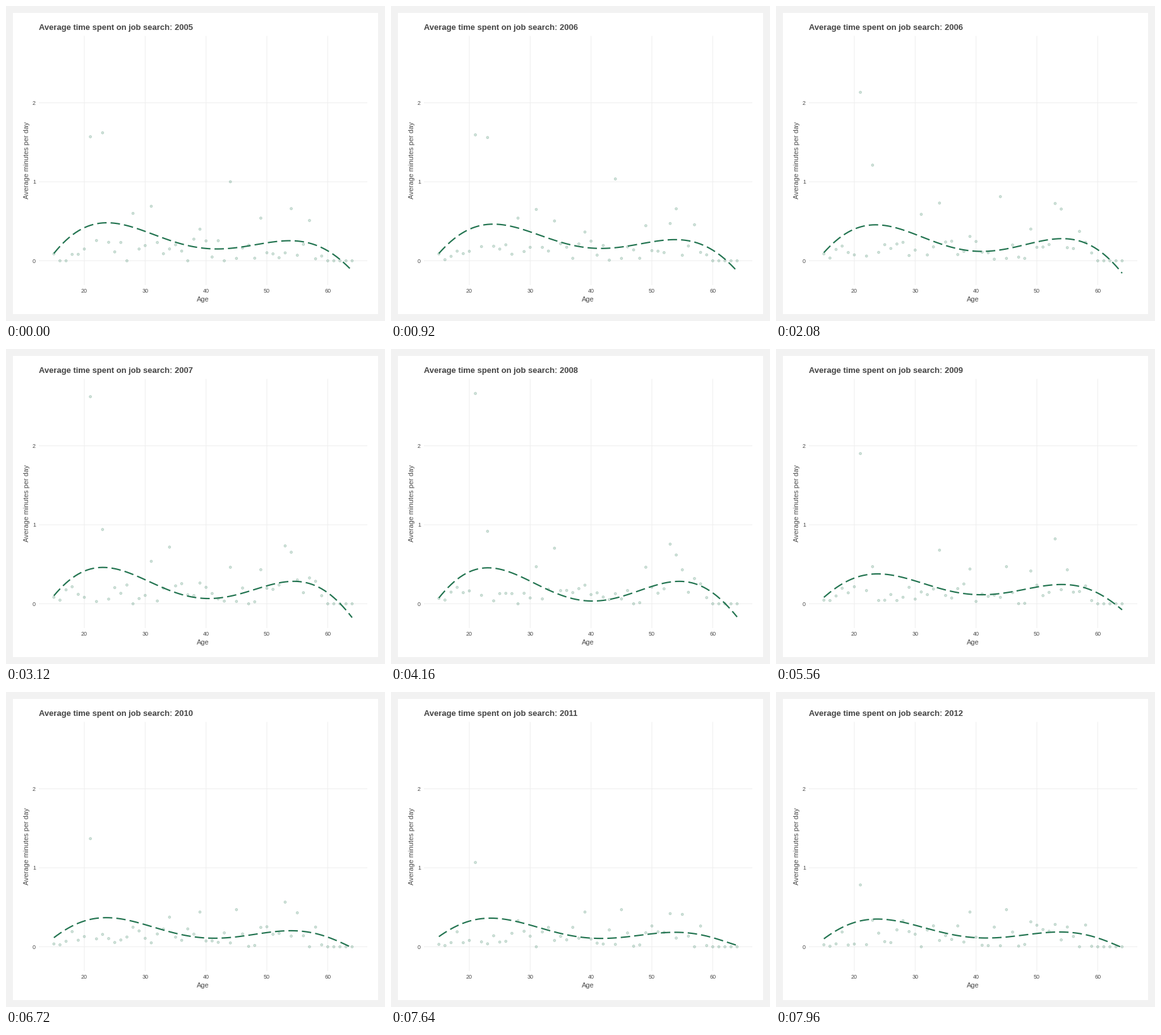
A matplotlib script for the animation above (8000 ms loop, 600 by 500 pixels).

```python
import numpy as np
import matplotlib.pyplot as plt
from matplotlib.animation import FuncAnimation
from matplotlib.patches import Rectangle

W, H, DPI = 600, 500, 100
PT = 72 / DPI  # points per pixel
GREEN = (0.13, 0.45, 0.31)
GREY = "#4d4d4d"
AGES = np.arange(15, 65)
FINE = np.linspace(15, 64, 99)
plt.rcParams["font.family"] = "Liberation Sans"

# Standout ages: (years since 2005, minutes per day) at each turn of the path
PATHS = {
    21: [(0, 1.57), (1, 1.61), (2, 2.59), (3, 2.7), (7, 0.57)],
    23: [(0, 1.62), (1, 1.52), (2, 0.94), (3, 0.94), (6, 0), (7, 0.56)],
    28: [(0, 0.6), (1, 0.5), (2, 0), (4, 0), (6, 0.33)],
    31: [(0, 0.69), (3, 0.49), (4, 0.2), (6, 0)],
    34: [(0, 0.15), (1, 0.74), (5, 0.67), (6, 0.08)],
    39: [(0, 0.4), (3, 0.22), (4, 0.44)],
    44: [(0, 1), (1, 1.06), (3, 0.13), (7, 0)],
    45: [(3, 0.03), (4, 0.47)],
    49: [(0, 0.54), (1, 0.38), (4, 0.5), (6, 0.16), (7, 0.42)],
    53: [(0, 0.1), (1, 0.72), (3, 0.74), (4, 0.95), (7, 0.18)],
    54: [(0, 0.66), (3, 0.65), (4, 0.2), (7, 0.07)],
    55: [(1, 0.07), (3, 0.43), (6, 0.43), (7, 0.13)],
    57: [(0, 0.51), (2, 0.33), (4, 0.31), (5, 0)],
}

# Trend heights: start, rise, first peak, dip, second peak, end
TREND_YEARS = [0, 1, 2, 3, 4, 6, 7]
TREND = np.array([
    (0.093, 0.378, 0.477, 0.153, 0.251, -0.127),
    (0.093, 0.345, 0.449, 0.163, 0.274, -0.135),
    (0.112, 0.382, 0.451, 0.084, 0.280, -0.176),
    (0.074, 0.374, 0.450, 0.032, 0.281, -0.171),
    (0.064, 0.290, 0.380, 0.119, 0.262, -0.109),
    (0.132, 0.302, 0.360, 0.107, 0.181, 0.021),
    (0.080, 0.265, 0.340, 0.117, 0.188, -0.031),
])


def px(age):
    return 75.8 + (np.asarray(age) - 15) * 9.635


def py(minutes):
    return 404.4 - np.asarray(minutes) * 125.4


def make_paths():
    """Standouts follow their own path, the rest drift near the axis."""
    rng = np.random.default_rng(5)
    paths = []
    for age in AGES:
        reach = min(1, (age - 12) / 8) if age < 60 else 0
        drift = reach * np.clip(rng.uniform(-0.04, 0.3, 4), 0, None)
        paths.append(PATHS.get(age, list(zip((0, 2, 4, 7), drift))))
    return [np.transpose(p) for p in paths]


DOT_PATHS = make_paths()


def dot_heights(year):
    return np.array([np.interp(year, t, v) for t, v in DOT_PATHS])


def trend_heights(year):
    a, b, c, d, e, f = (np.interp(year, TREND_YEARS, col) for col in TREND.T)
    # Equal heights on both sides of a turn keep it level there
    knots = np.array([15, 19, 23, 25, 40, 42, 53, 55, 64])
    fit = np.polyfit((knots - 40) / 25, [a, b, c, c, d, d, e, e, f], 6)
    return np.polyval(fit, (FINE - 40) / 25)


fig = plt.figure(figsize=(W / DPI, H / DPI), dpi=DPI, facecolor="#f2f2f2")
ax = fig.add_axes([0, 0, 1, 1])
ax.set(xlim=(0, W), ylim=(H, 0))
ax.axis("off")
ax.add_patch(Rectangle((11, 11), 578, 478, fc="white", lw=0, zorder=0))


def label(x, y, text, size, **kw):
    kw = {"ha": "center", "va": "baseline", "color": GREY, **kw}
    return ax.text(x, y, text, fontsize=size * PT, rotation_mode="anchor", **kw)


def grid(xs, ys):
    ax.plot(xs, ys, color="#efefef", lw=1.07 * PT, snap=False, zorder=1,
            solid_capstyle="butt")


for age in range(20, 61, 10):
    grid([px(age)] * 2, [47.5, 443])
    label(px(age), 455, str(age), 9)
for m in range(3):
    grid([52, 572], [py(m)] * 2)
    label(47, py(m) + 3.1, str(m), 9, ha="right")

label(312, 469, "Age", 11)
label(36, 245, "Average minutes per day", 11, rotation=90)
title = label(52, 38, "", 13.05, ha="left", weight="bold", color="#444444")

points = ax.scatter(px(AGES), py(dot_heights(0)), s=(3.9 * PT) ** 2,
                    facecolors=[GREEN + (0.2,)] * len(AGES),
                    edgecolors=[GREEN + (0.28,)] * len(AGES),
                    linewidths=0.7 * PT, zorder=2)
points.set_snap(False)
curve, = ax.plot(px(FINE), py(trend_heights(0)), color=GREEN, lw=2.13 * PT,
                 ls=(0, (7, 3)), dash_capstyle="butt", zorder=3)

# Frames where each year's move starts and ends
MOVES = [14, 29, 44, 59, 74, 88, 103, 117, 132, 146, 161, 175, 190, 205]
YEARS = [(k + 1) // 2 for k in range(len(MOVES))]


def draw(i):
    year = np.interp(i, MOVES, YEARS)
    title.set_text(f"Average time spent on job search: {2005 + int(year + 0.45)}")
    points.set_offsets(np.column_stack([px(AGES), py(dot_heights(year))]))
    curve.set_ydata(py(trend_heights(year)))
    return title, points, curve


anim = FuncAnimation(fig, draw, frames=200, interval=40, repeat=True,
                     repeat_delay=0, blit=False)
plt.show()
```
